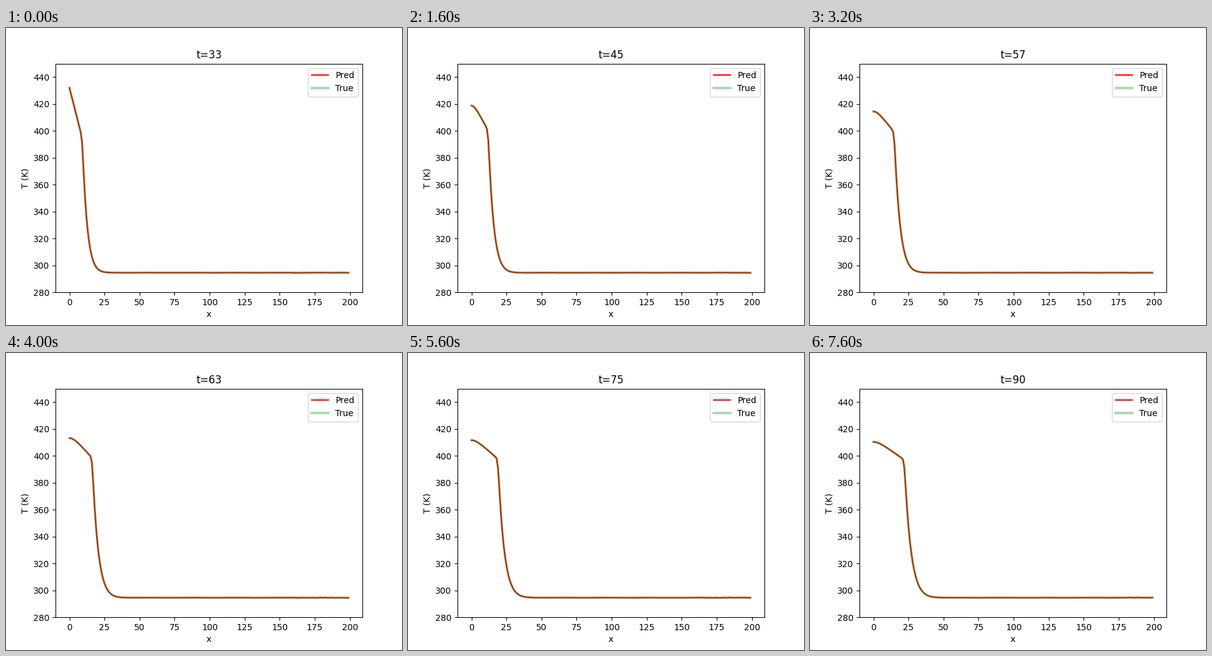
A matplotlib script that plays this animation: 640 by 480 pixels, repeating every 8 s.

```python
import numpy as np
import matplotlib.pyplot as plt
from matplotlib.animation import FuncAnimation

FRAMES, INTERVAL = 20, 400
START, STEP = 33, 3
AMBIENT = 294.6
x = np.arange(200)


def soft_min(a, b, width=9.0):
    return -width * np.logaddexp(-a / width, -b / width)


def plateau(s):
    """Hot side: rounded at the left edge, then a slope that flattens as it cools."""
    heat = 1 / (1 + s / 11.6)
    rounding = 6.5 * (1 - heat)
    drop = np.hypot(x, rounding) - rounding
    return np.maximum(406 + 26 * heat - (0.1 + 4 * heat) * drop, 360)


def tail(s):
    """Near-exponential fall to ambient behind a slowly braking front."""
    front = 11.85 + 0.273 * s - 0.00053 * s**2
    decay = 3.3 + 1.1 * (s / 57) ** 0.8
    u = (x - front) / decay
    return AMBIENT + 45 * np.exp(-u - (np.maximum(u, 0) / 5) ** 2)


def temperature(t):
    s = t - START
    return soft_min(plateau(s), tail(s))


def prediction(t, true):
    rng = np.random.default_rng(t)
    ripple = 0.04 * np.sin(x / 5 + rng.uniform(0, 6))
    jitter = rng.normal(0, 1, x.size) * np.where(x > 160, 0.08, 0.02)
    return true + ripple + jitter


fig, ax = plt.subplots(figsize=(6.4, 4.8), dpi=100)
pred_line, = ax.plot(x, x, "r", label="Pred")
true_line, = ax.plot(x, x, "g", lw=3, alpha=0.3, label="True")
ax.set_ylim(280, 450)
ax.set_xlabel("x")
ax.set_ylabel("T (K)")
ax.legend(loc="upper right")
title = ax.set_title("")


def update(i):
    t = START + STEP * i
    true = temperature(t)
    pred_line.set_ydata(prediction(t, true))
    true_line.set_ydata(true)
    title.set_text(f"t={t}")
    return pred_line, true_line, title


anim = FuncAnimation(fig, update, frames=FRAMES, interval=INTERVAL,
                     repeat=True, repeat_delay=0)
plt.show()
```
